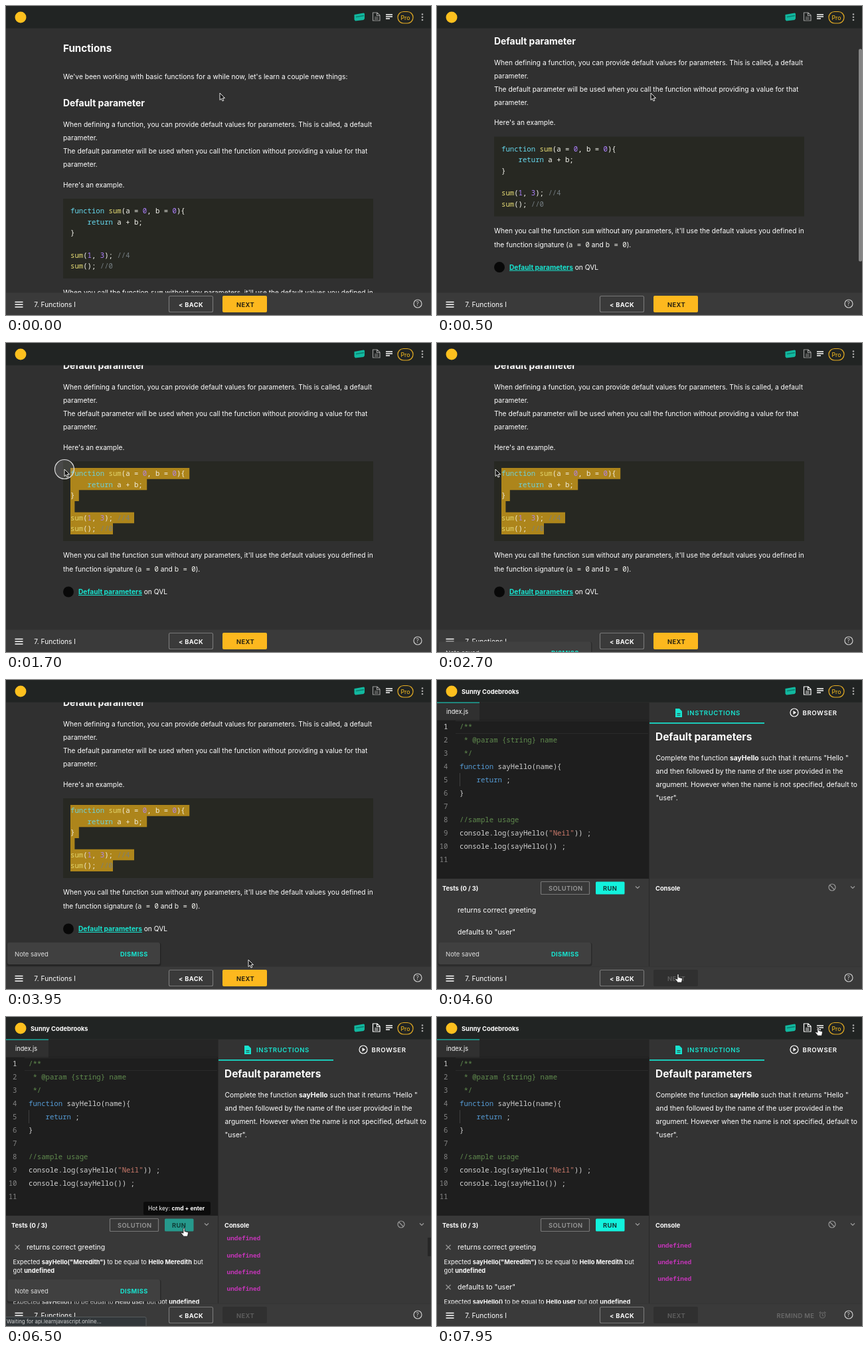
Write an HTML page that moves like this. It is 640 px wide and 465 px high and loops after 8000 ms.

```html
<!DOCTYPE html>
<html lang="en">
<head>
<meta charset="utf-8">
<title>Lesson: default parameters</title>
<style>
  html, body { margin: 0; width: 100%; height: 100%; overflow: hidden; background: #303030; }
  svg { display: block; width: 640px; height: 465px; }
  text { font: 10.2px Inter, sans-serif; fill: #fff; white-space: pre; }
  .b { font-weight: 700; }
  .h1 { font-size: 15.2px; font-weight: 700; }
  .h2 { font-size: 13.9px; font-weight: 700; }
  .task text { font-size: 10.35px; }
  .task .h1 { font-size: 15.45px; }
  .task .tab { font-size: 9.6px; font-weight: 600; letter-spacing: .6px; }
  .btn { font-size: 9.3px; font-weight: 600; letter-spacing: .4px; }
  .strong { font-weight: 700; }
  .label { font-size: 9.3px; font-weight: 700; }
  .small { font-size: 9.2px; }
  .item { font-size: 10.5px; }
  .code text, .mono { font: 10.67px "Noto Sans Mono", "DejaVu Sans Mono", monospace; fill: #f8f8f2; }
  .editor text { fill: #d4d4d4; }
  .key { fill: #66d9ef; } .fn { fill: #e6db74; } .num { fill: #ae81ff; } .note { fill: #747d82; }
  .editor .key { fill: #569cd6; } .editor .note { fill: #608b4e; } .str { fill: #ce7b6c; }
  .editor .line { fill: #858585; } .editor .on { fill: #d0d0d0; }
  .log { font: 700 9.4px "Noto Sans Mono", "DejaVu Sans Mono", monospace; fill: #c435b8; }
  .teal { fill: #18e3cf; }
  .stroke { fill: none; stroke: #ccc; stroke-width: 1.2; }
  .dim { stroke: #999; }
  .faint { stroke: #6a6a6a; }
</style>
</head>
<body>
<svg viewBox="0 0 640 465">
  <rect width="640" height="465" fill="#303030"/>

  <g id="lesson">
    <g id="page">
      <text class="h1" x="86" y="69">Functions</text>
      <text x="86" y="110">We've been working with basic functions for a while now, let's learn a couple new things:</text>
      <text class="h2" x="86" y="151">Default parameter</text>
      <text x="86" y="182">When defining a function, you can provide default values for parameters. This is called, a default</text>
      <text x="86" y="202">parameter.</text>
      <text x="86" y="222">The default parameter will be used when you call the function without providing a value for that</text>
      <text x="86" y="242">parameter.</text>
      <text x="86" y="272.500">Here's an example.</text>
      <rect x="86" y="290" width="467" height="120" fill="#272822"/>
      <path class="selection" fill="#ad851c"/>
      <g class="code">
        <text x="97" y="312"><tspan class="key">function</tspan> <tspan class="fn">sum</tspan>(a = <tspan class="num">0</tspan>, b = <tspan class="num">0</tspan>){</text>
        <text x="97" y="328.7">    <tspan class="key">return</tspan> a + b;</text>
        <text x="97" y="345.3">}</text>
        <text x="97" y="378.7"><tspan class="fn">sum</tspan>(<tspan class="num">1</tspan>, <tspan class="num">3</tspan>); <tspan class="note">//4</tspan></text>
        <text x="97" y="395.3"><tspan class="fn">sum</tspan>(); <tspan class="note">//0</tspan></text>
      </g>
      <path class="selection" fill="#ad851c" opacity=".1"/>
      <text x="86" y="435">When you call the function <tspan class="mono">sum</tspan> without any parameters, it'll use the default values you defined in</text>
      <text x="86" y="456">the function signature (<tspan class="mono">a = 0</tspan> and <tspan class="mono">b = 0</tspan>).</text>
      <circle cx="94" cy="486.500" r="8" fill="#080808"/>
      <text x="109" y="490"><tspan class="b teal" text-decoration="underline">Default parameters</tspan> on QVL</text>
    </g>
    <rect id="pageBar" x="635" width="5" height="320" rx="2.500" fill="#858585"/>
  </g>

  <g id="exercise">
    <rect y="34" width="320" height="265" fill="#252525"/>
    <rect y="60" width="319" height="239" fill="#1e1e1e"/>
    <rect y="34" width="64" height="26.500" fill="#303030"/>
    <rect y="33" width="64" height="1.500" class="teal"/>
    <text class="small" x="14" y="51">index.js</text>
    <path d="M28 61.500H318M28 80.500H318" stroke="#2a2a2a"/>
    <path d="M34.500 140V160" stroke="#404040"/>
    <g class="code editor">
      <g id="lineNumbers"></g>
      <text x="34" y="74"><tspan class="note">/**</tspan></text>
      <text x="34" y="94"><tspan class="note"> * @param {string} name</tspan></text>
      <text x="34" y="114"><tspan class="note"> */</tspan></text>
      <text x="34" y="134"><tspan class="key">function</tspan> sayHello(name){</text>
      <text x="34" y="154">    <tspan class="key">return</tspan> ;</text>
      <text x="34" y="174">}</text>
      <text x="34" y="214"><tspan class="note">//sample usage</tspan></text>
      <text x="34" y="234">console.log(sayHello(<tspan class="str">"Neil"</tspan>)) ;</text>
      <text x="34" y="254">console.log(sayHello()) ;</text>
    </g>

    <g class="task">
      <rect x="320" y="34" width="320" height="265" fill="#333"/>
      <rect x="320" y="64" width="173" height="1.700" class="teal"/>
      <path class="teal" d="M359 43h6l4 4v9h-10z"/>
      <path d="M361.500 50.500h5M361.500 53h5" stroke="#333"/>
      <text class="tab" x="377" y="53" style="fill:#18e3cf">INSTRUCTIONS</text>
      <circle cx="538" cy="49" r="6" class="stroke" style="stroke:#fff"/>
      <path d="M536.500 46l4.500 3-4.500 3z" fill="#fff"/>
      <text class="tab" x="550.500" y="53">BROWSER</text>
      <text class="h1" x="329" y="91">Default parameters</text>
      <text x="329.500" y="121">Complete the function <tspan class="b">sayHello</tspan> such that it returns "Hello "</text>
      <text x="329.500" y="141">and then followed by the name of the user provided in the</text>
      <text x="329.500" y="161">argument. However when the name is not specified, default to</text>
      <text x="329.500" y="181">"user".</text>
    </g>

    <rect y="299" width="640" height="132" fill="#383838"/>
    <g id="waiting">
      <text class="item" x="31" y="350">returns correct greeting</text>
      <text class="item" x="31" y="383">defaults to "user"</text>
    </g>
    <g id="failed">
      <path class="stroke dim" d="M13.500 343l7 7m0-7l-7 7M13.500 403l7 7m0-7l-7 7"/>
      <text class="item" x="31" y="350">returns correct greeting</text>
      <text class="small" x="10.500" y="372">Expected <tspan class="b">sayHello("Meredith")</tspan> to be equal to <tspan class="b">Hello Meredith</tspan> but</text>
      <text class="small" x="10.500" y="385">got <tspan class="b">undefined</tspan></text>
      <text class="item" x="31" y="410">defaults to "user"</text>
      <text class="small" x="10.500" y="432">Expected <tspan class="b">sayHello()</tspan> to be equal to <tspan class="b">Hello user</tspan> but got <tspan class="b">undefined</tspan></text>
    </g>
    <g id="logs"></g>
    <rect id="logBar" x="635" y="332" width="5" height="28" fill="#262626"/>
    <rect y="299" width="640" height="28" fill="#383838"/>
    <path d="M319.500 34V431" stroke="#2a2a2a"/>
    <text class="label" x="8" y="316.500">Tests (0 / 3)</text>
    <rect x="156.500" y="303.500" width="73" height="19" rx="1" class="stroke" style="stroke:#777"/>
    <text class="btn" x="168" y="316.500" style="fill:#999">SOLUTION</text>
    <rect id="run" x="239" y="303.500" width="43.500" height="19" rx="1.500"/>
    <text class="btn strong" x="250" y="316.500" id="runLabel">RUN</text>
    <text class="label" x="329" y="316.500">Console</text>
    <path class="stroke dim" d="M299 310.500l3 3 3-3M623 310.500l3 3 3-3M591.500 308.500l7 7"/>
    <circle cx="595" cy="312" r="5" class="stroke dim"/>
    <g id="tooltip">
      <rect x="207" y="278" width="101" height="20" rx="2" fill="#0c0c0c"/>
      <text x="214" y="291" style="font-size:8.5px">Hot key: <tspan class="b">cmd + enter</tspan></text>
    </g>
  </g>

  <rect width="640" height="33.500" fill="#212423"/>
  <circle cx="22" cy="17" r="8.500" fill="#fdc01e"/>
  <text id="course" class="label" x="37" y="20.500">Sunny Codebrooks</text>
  <path fill="#12b89f" d="M524.500 13l14-2.500q1.500 0 1.500 1.500v7l-1.500 2-12.500 1.500-1.500-2z"/>
  <path d="M527 16.500l12-2" stroke="#0a7d6d" stroke-width="1.500"/>
  <path id="docIcon" class="stroke" d="M552.500 10h6.500l4 4v8h-10.500zM558.500 10v4.500h4.500M555 17h5.500M555 19.500h5.500"/>
  <path d="M572 13h10M572 16h10M572 19h6" stroke="#fff" stroke-width="1.500"/>
  <rect x="590" y="8.500" width="23" height="17.500" rx="8.700" class="stroke" style="stroke:#e5ad24"/>
  <text x="594.500" y="20.500" style="font-size:8.700px;fill:#fdc01e">Pro</text>
  <g fill="#aaa"><circle cx="627" cy="12.500" r="1.300"/><circle cx="627" cy="16.800" r="1.300"/><circle cx="627" cy="21" r="1.300"/></g>

  <rect y="431.500" width="640" height="34" fill="#3a3a3a"/>
  <path d="M13.500 445.500h12M13.500 449.200h12M13.500 453h12" stroke="#fff" stroke-width="1.400"/>
  <text x="42.300" y="452.500">7. Functions I</text>
  <rect x="245.500" y="436.500" width="66" height="24" rx="2" class="stroke" style="stroke:#777"/>
  <text class="btn strong" x="260" y="452.500">&lt; BACK</text>
  <rect id="next" x="326" y="436" width="67" height="25" rx="2"/>
  <text id="nextLabel" class="btn strong" x="347" y="452.500">NEXT</text>
  <g id="remind">
    <text class="btn" x="511.500" y="452.500" style="fill:#6a6a6a">REMIND ME</text>
    <circle cx="580.500" cy="449" r="4" class="stroke faint"/>
    <path class="stroke faint" d="M580.500 446.500v2.500l1.500 1M575.500 445.500l2.500-2M585.500 445.500l-2.500-2"/>
  </g>
  <circle cx="620" cy="448" r="6" class="stroke"/>
  <text x="617.600" y="451.300" style="font-size:8.500px;fill:#ccc">?</text>

  <g id="toast">
    <rect x="1.500" y="395.500" width="232" height="35" rx="3" fill="#000" opacity=".25"/>
    <rect x="2" y="395" width="230" height="33" rx="3" fill="#404040"/>
    <text x="13" y="415.500" style="font-size:9.500px;fill:#ddd">Note saved</text>
    <text class="btn strong" x="172" y="415.500" style="fill:#18e3cf">DISMISS</text>
  </g>
  <g id="status">
    <rect x="-3" y="451.500" width="214" height="17" rx="2" fill="#32373a" stroke="#565b5d"/>
    <text x="1" y="461" style="font-size:7.900px;fill:#d0d0d0">Waiting for api.learnjavascript.online...</text>
  </g>

  <g id="cursor">
    <circle id="ring" r="14.500" fill="#aaa" fill-opacity=".2" stroke="#ddd" stroke-width="1.200"/>
    <path id="arrow" d="M0 0V10.500L2.400 8.300 4 12 5.800 11.200 4.200 7.600H7.500Z" fill="#111" stroke="#fff" stroke-width=".9"/>
    <path id="hand" transform="scale(1.1)" d="M-1 1Q0-.5 1 1V5L5 6Q6 6.500 5.800 8L5 12H-.5L-4 7.500Q-3.500 6-1 7.500Z" fill="#fff" stroke="#111" stroke-width=".8"/>
  </g>
</svg>
<script>
const LOOP = 8000, CHAR = 6.4, ROW = 16.67, CODE_X = 97, CODE_Y = 300;
const PAGE_SWITCH = 4400;
const rowLengths = [28, 18, 2, 1, 15, 10];
const presses = [[1440, 1740], [4130, 4240], [6230, 6340]];
// Pointer stops: time, x, y
const stops = [
  [0, 322, 131], [1200, 322, 131], [1420, 162, 281], [1470, 162, 281], [1680, 88, 190],
  [3200, 88, 190], [3700, 365, 421], [3980, 365, 421], [4100, 363, 442], [4900, 363, 442],
  [5600, 289, 322], [5750, 289, 322], [5950, 268, 317], [7380, 268, 317], [7900, 574, 15], [8000, 574, 15]
];

const $ = id => document.getElementById(id);
const clamp = (v, lo = 0, hi = 1) => Math.min(hi, Math.max(lo, v));
const progress = (t, start, length) => clamp((t - start) / length);
const easeOut = u => 1 - (1 - u) ** 3;
const easeInOut = u => u * u * (3 - 2 * u);
const between = (t, start, end) => t >= start && t < end;
const show = (id, on) => { $(id).style.display = on ? '' : 'none'; };
const move = (id, x, y) => $(id).setAttribute('transform', `translate(${x} ${y})`);

$('lineNumbers').innerHTML = Array.from({ length: 11 }, (_, i) =>
  `<text class="line ${i ? '' : 'on'}" x="16.500" y="${74 + i * 20}" text-anchor="end">${i + 1}</text>`).join('');
$('logs').innerHTML = Array.from({ length: 4 }, (_, i) =>
  `<text class="log" x="332.500" y="${343.3 + i * 25.3}">undefined</text>`).join('');

function pointerAt(t) {
  const i = stops.findIndex(stop => stop[0] > t);
  const [t0, x0, y0] = stops[i - 1], [t1, x1, y1] = stops[i];
  const u = easeInOut((t - t0) / (t1 - t0));
  return [x0 + (x1 - x0) * u, y0 + (y1 - y0) * u];
}

// Everything from the pointer down to the end of the code is selected.
function selectionPath(x, y) {
  const first = clamp(Math.floor((y - CODE_Y) / ROW), 0, 5);
  return rowLengths.map((length, row) => {
    if (row < first) return '';
    const right = CODE_X + length * CHAR;
    const column = Math.round((x - CODE_X) / CHAR);
    const left = row === first ? clamp(CODE_X + column * CHAR, CODE_X, right) : CODE_X;
    return `M${left} ${CODE_Y + row * ROW}H${right}v${ROW}H${left}z`;
  }).join('');
}

function draw(t) {
  const lesson = t < PAGE_SWITCH;
  const [x, y] = pointerAt(t);
  const scroll = 112 * easeOut(progress(t, 320, 402));
  show('lesson', lesson);
  show('exercise', !lesson);
  show('course', !lesson);

  move('page', 0, -scroll);
  $('pageBar').setAttribute('y', scroll * .69);
  $('pageBar').style.opacity = t < 330 ? 0 : 1 - progress(t, 950, 200);
  const [dragX, dragY] = pointerAt(Math.min(t, 1700));
  const path = t < 1470 ? '' : selectionPath(dragX, dragY + scroll);
  document.querySelectorAll('.selection').forEach(el => el.setAttribute('d', path));

  const hoverRun = between(t, 5900, 7420);
  $('run').style.fill = hoverRun ? '#26998c' : '#12f2dd';
  $('runLabel').style.fill = hoverRun ? '#103c37' : '#123b38';
  show('tooltip', between(t, 5980, 7450));
  show('waiting', t < 6350);
  show('failed', t >= 6350);

  const logCount = t < 4700 ? 0 : t < 6400 ? 2 : 4;
  [...$('logs').children].forEach((log, i) => { log.style.display = i < logCount ? '' : 'none'; });
  move('logs', 0, -22 * easeInOut(progress(t, 6430, 190)));
  $('logBar').style.opacity = t < 6430 ? 0 : 1 - progress(t, 7350, 200);

  $('next').style.fill = lesson ? '#fdb81e' : '#303030';
  $('nextLabel').style.fill = lesson ? '#2b2410' : '#5c5c5c';
  $('docIcon').style.stroke = lesson ? '#999' : '#fff';
  show('remind', t >= 6900);
  show('status', between(t, 6420, 6700));
  show('toast', between(t, 2700, 7000));
  move('toast', 0, 70 * (1 - easeOut(progress(t, 2680, 260))));
  $('toast').style.opacity = 1 - progress(t, 6800, 200);

  const hand = between(t, 4060, 4900) || between(t, 5550, 7500) || t > 7850;
  move('cursor', x, y);
  show('hand', hand);
  show('arrow', !hand);
  show('ring', presses.some(([start, end]) => between(t, start, end)));
}

function frame() {
  draw(performance.now() % LOOP);
  requestAnimationFrame(frame);
}
frame();
</script>
</body>
</html>
```
